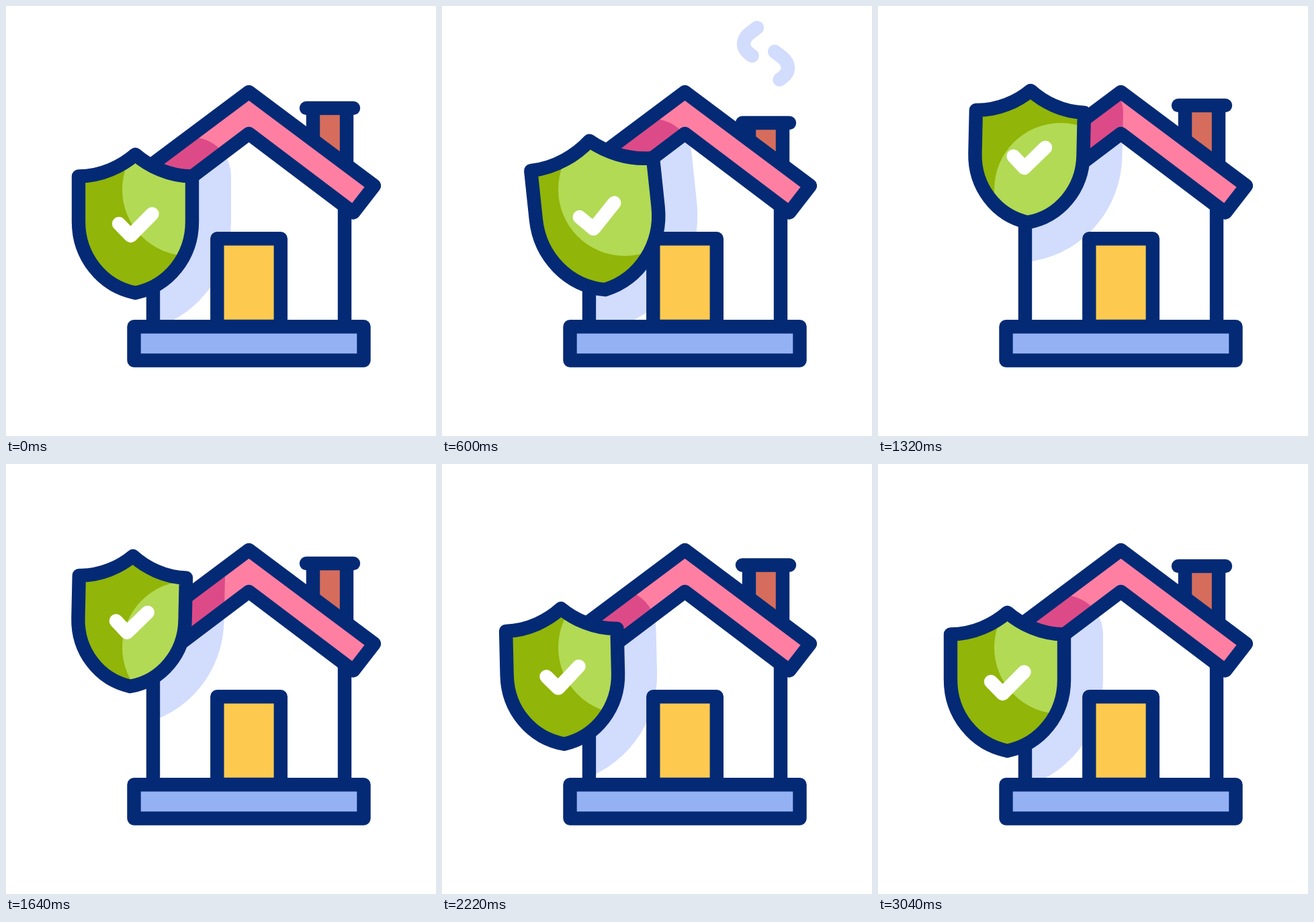
An HTML page with a canvas for the animation above (3.2 s loop, 640x640 px).

```html
<!DOCTYPE html>
<html lang="en">
<head>
<meta charset="utf-8">
<title>Protected house</title>
<style>
html, body { margin: 0; width: 100%; height: 100%; overflow: hidden; background: #fff; }
canvas { display: block; width: 640px; height: 640px; }
</style>
</head>
<body>
<canvas id="stage"></canvas>
<script>
const LOOP = 3200;
const C = {
  navy: '#042a75', pink: '#ff7fa3', rose: '#dc4b87', brick: '#d66d5c', base: '#94b1f3',
  pale: '#d2dcfd', gold: '#fdca4f', green: '#91b508', lime: '#b2da54', white: '#fff'
};

const canvas = document.getElementById('stage');
const ctx = canvas.getContext('2d');
const ratio = window.devicePixelRatio || 1;
canvas.width = canvas.height = 640 * ratio;

// Smooth curve through [time, value] steps; flat at peaks and at both ends.
function track(keys) {
  const gap = i => keys[i + 1][0] - keys[i][0];
  const rate = i => (keys[i + 1][1] - keys[i][1]) / gap(i);
  const slope = keys.map((_, i) => {
    if (i === 0 || i === keys.length - 1) return 0;
    const a = rate(i - 1), b = rate(i);
    if (a * b <= 0) return 0;
    const w1 = 2 * gap(i) + gap(i - 1), w2 = gap(i) + 2 * gap(i - 1);
    return (w1 + w2) / (w1 / a + w2 / b);
  });
  return t => {
    let i = 0;
    while (i < keys.length - 2 && t >= keys[i + 1][0]) i++;
    const h = gap(i), u = Math.min(1, (t - keys[i][0]) / h), v = 1 - u;
    return v * v * (1 + 2 * u) * keys[i][1] + u * u * (3 - 2 * u) * keys[i + 1][1]
      + h * u * v * (v * slope[i] - u * slope[i + 1]);
  };
}

const shieldX = track([[0, 192.5], [300, 204], [600, 231], [900, 247.5], [1100, 244], [1320, 225],
  [1620, 190], [1880, 150.5], [1960, 153.5], [2160, 175], [2500, 192.5], [LOOP, 192.5]]);
const shieldY = track([[0, 324], [300, 321.5], [600, 311.5], [900, 275], [1100, 249], [1320, 224],
  [1400, 222], [1620, 232], [1800, 264], [1960, 294], [2160, 313], [2500, 323.5], [LOOP, 324]]);
const shieldSize = track([[0, 1], [300, 1.02], [600, 1.081], [900, 1.154], [980, 1.16], [1320, 0.953],
  [1640, 0.942], [1960, 0.942], [2400, 1], [LOOP, 1]]);
const shieldTurn = track([[0, 0], [300, -1.9], [600, -6], [900, -10], [1000, -10.3], [1320, 1.3],
  [1960, 1.1], [2500, -4], [2580, -3.7], [2720, -2.6], [3040, 0], [LOOP, 0]]);
const chimneyDrop = track([[0, 0], [300, 7], [600, 22], [900, 36], [1000, 37], [1320, -4],
  [1960, -4], [2400, 0], [LOOP, 0]]);

const ease = (t, from, to) => {
  const u = Math.max(0, Math.min(1, (t - from) / (to - from)));
  return u * u * (3 - 2 * u);
};

function pathLength(d) {
  const el = document.createElementNS('http://www.w3.org/2000/svg', 'path');
  el.setAttribute('d', d);
  return el.getTotalLength();
}

function moved(path, matrix) {
  const out = new Path2D();
  out.addPath(path, matrix);
  return out;
}

const roof = new Path2D('M361.5 128L548 267.5 517 307.5 361.5 190 206 307.5 175 267.5Z');
const wall = new Path2D('M219 477V298L361.5 190 504 298V477Z');
const wallLines = new Path2D('M219 477V298M504 477V298');
const door = new Path2D('M314.3 477V346.3H408.8V477Z');
const base = new Path2D('M190.5 477.3H532.5V527.5H190.5Z');
const chimney = new Path2D('M457 152V217L507 255V152Z');
const chimneyLines = new Path2D('M457 152V217M507 152V255');
const chimneyCap = new Path2D('M447 152H517');
const glow = new Path2D();
glow.arc(272, 273, 99, 0, Math.PI * 2);

// Shield and tick are drawn around their own centre.
const shield = new Path2D('M0 -103C-19.5 -86 -50 -70.5 -84.5 -70.5V-3C-84.5 49 -49.5 93 0 103' +
  'C49.5 93 84.5 49 84.5 -3V-70.5C50 -70.5 19.5 -86 0 -103Z');
const tickD = 'M-24.5 0L-7 18L25 -14.5';
const tick = new Path2D(tickD), tickLen = pathLength(tickD);

const smokeD = 'M475 92C474 84 468 79 460 73C456 70 449 65 449 57C449 49 453 44.5 458 40.5' +
  'L470 31.5C473 28.5 475 24 475 20';
const smoke = new Path2D(smokeD), smokeLen = pathLength(smokeD);
const smokeTwin = moved(smoke, new DOMMatrix([-1, 0, 0, 1, 964, 35.5]));

function fill(path, color) {
  ctx.fillStyle = color;
  ctx.fill(path);
}

function stroke(path, color, width = 20.4) {
  ctx.strokeStyle = color;
  ctx.lineWidth = width;
  ctx.stroke(path);
}

function trim(path, len, from, to, color) {
  if (to - from < 0.002) return;
  ctx.setLineDash([len * (to - from), len * 2]);
  ctx.lineDashOffset = -len * from;
  stroke(path, color);
  ctx.setLineDash([]);
}

function inside(area, draw) {
  ctx.save();
  ctx.clip(area);
  draw();
  ctx.restore();
}

function draw(t) {
  ctx.setTransform(ratio, 0, 0, ratio, 0, 0);
  ctx.fillStyle = C.white;
  ctx.fillRect(0, 0, 640, 640);
  ctx.lineJoin = 'round';

  const size = shieldSize(t);
  const pose = new DOMMatrix().translate(shieldX(t), shieldY(t)).rotate(shieldTurn(t)).scale(size);
  const body = moved(shield, pose);
  const mark = moved(tick, pose);
  const shadow = color => {
    fill(body, color);
    stroke(body, color, 116);
  };

  ctx.lineCap = 'round';
  const puffFrom = ease(t, 385, 1050), puffTo = ease(t, 100, 767);
  trim(smoke, smokeLen, puffFrom, puffTo, C.pale);
  trim(smokeTwin, smokeLen, puffFrom, puffTo, C.pale);

  ctx.save();
  ctx.translate(0, chimneyDrop(t));
  fill(chimney, C.brick);
  ctx.lineCap = 'butt';
  stroke(chimneyLines, C.navy);
  ctx.lineCap = 'round';
  stroke(chimneyCap, C.navy);
  ctx.restore();

  fill(wall, C.white);
  inside(wall, () => shadow(C.pale));
  stroke(wallLines, C.navy);
  fill(door, C.gold);
  stroke(door, C.navy);
  fill(base, C.base);
  stroke(base, C.navy);

  fill(roof, C.pink);
  inside(roof, () => shadow(C.rose));
  stroke(roof, C.navy);

  fill(body, C.green);
  inside(body, () => fill(glow, C.lime));
  stroke(body, C.navy);
  stroke(mark, C.white);
  trim(mark, tickLen * size, ease(t, 2640, 3000), ease(t, 2254, 2614), C.gold);
}

const begin = performance.now();
function frame() {
  draw((performance.now() - begin) % LOOP);
  requestAnimationFrame(frame);
}
frame();
</script>
</body>
</html>
```
